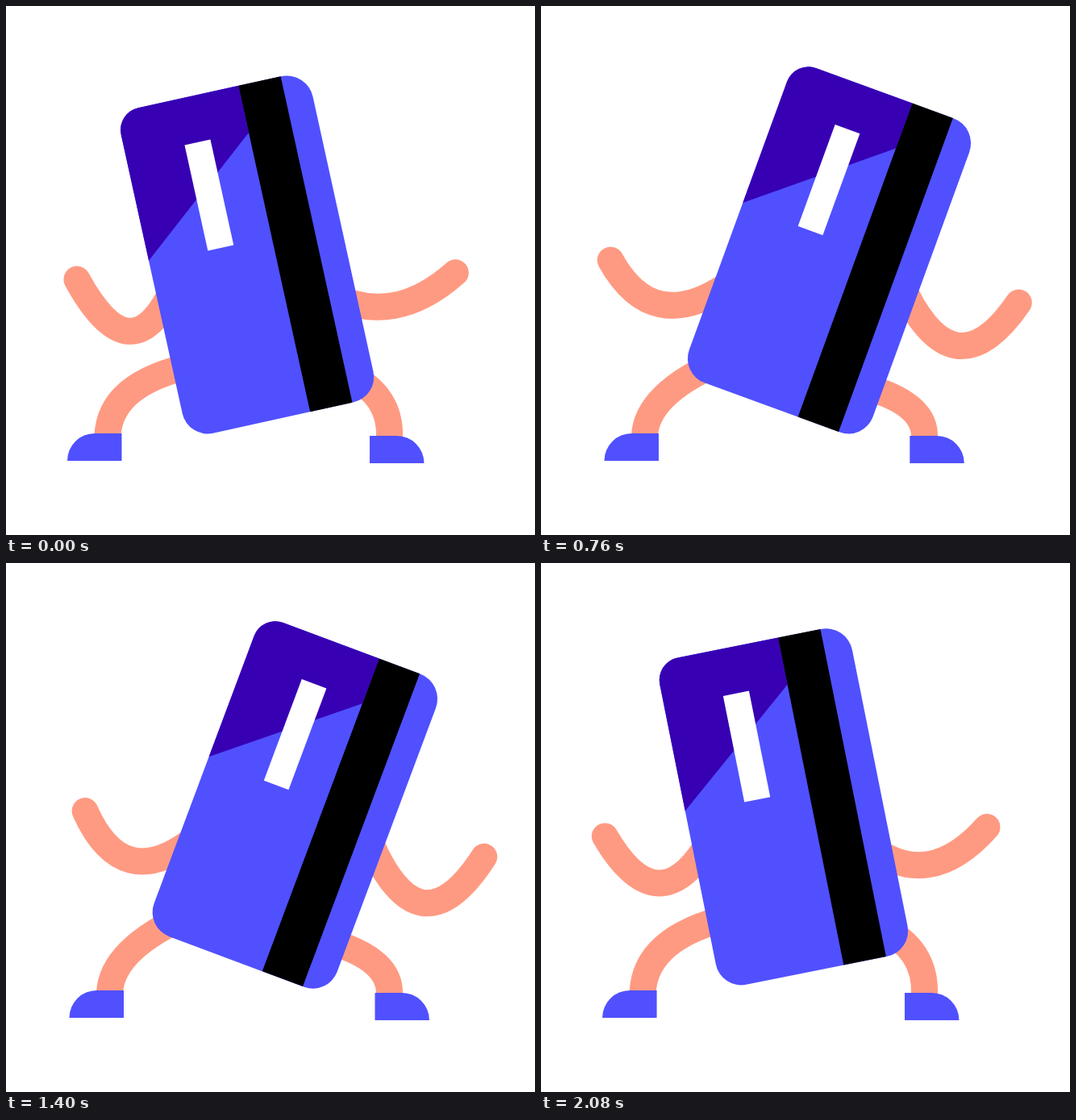
Animation of 656 by 656 pixels, one loop 2120 ms. Source, as an HTML page with a canvas:

```html
<!DOCTYPE html>
<html lang="en">
<head>
<meta charset="utf-8">
<title>Dancing card</title>
<style>
html, body { margin: 0; width: 100%; height: 100%; overflow: hidden; background: #fff; }
canvas { display: block; }
</style>
</head>
<body>
<canvas id="stage" width="656" height="656"></canvas>
<script>
const ctx = document.getElementById('stage').getContext('2d');
const STEP = 40, COUNT = 53;
const BLUE = '#5050ff', DARK = '#3700b3', SKIN = '#ff9a82';

// Cosine with a whole number of cycles per loop, highest at step `peak`
const wave = (n, cycles, peak) => Math.cos(2 * Math.PI * cycles * (n - peak) / COUNT);

function ease(p) {
  p = Math.min(1, Math.max(0, p));
  return (1 - Math.cos(Math.PI * p)) / 2;
}

// 0 = card tilted left, 1 = card tilted right
function leanAt(n) {
  n = (n + COUNT) % COUNT;
  return ease((n - 2) / 18.4) - ease((n - 42) / 11.3);
}

function limb(x, y, bendX, bendY, rootX, rootY) {
  ctx.beginPath();
  ctx.moveTo(x, y);
  ctx.quadraticCurveTo(bendX, bendY, rootX, rootY);
  ctx.stroke();
}

// k = lean of the arms, s = swing (1 is towards the right)
function leftArm(k, s, bob) {
  limb(
    61 + 33 * k + 28 * s, 354.5 - 52 * k + (20 * k - 23) * s + bob,
    135 + 7 * k + (23 - 7 * k) * s, 458 - 56 * k + 26 * k * s + bob,
    207 + 26 * k, 341 - 4 * k + bob
  );
}

function rightArm(k, s, bob) {
  limb(
    517 + 79 * k + 36.5 * s, 309.5 + 52 * k + (10 + 21 * k) * s + bob,
    463.5 + 49.5 * k + (14 + 9 * k) * s, 420 + 63 * k - 33 * s + bob,
    400 + 48 * k, 352 - 20 * k + bob
  );
}

function shoe(x, y, flip) {
  ctx.save();
  ctx.translate(x, y);
  if (flip) ctx.transform(-1, 0, 0, 1, 67.5, 0);
  ctx.beginPath();
  ctx.moveTo(0, 34);
  ctx.arc(34, 34, 34, Math.PI, Math.PI * 1.5);
  ctx.lineTo(67.5, 0);
  ctx.lineTo(67.5, 34);
  ctx.fill();
  ctx.restore();
}

function leftLeg(k, bob) {
  const x = 76 + 2.5 * k;
  limb(x + 50, 533, 129 + 2 * k, 463 + 12 * k + bob / 2, 235 - 5 * k, 438 - 9 * k + bob);
  shoe(x, 530, false);
}

function rightLeg(k, bob) {
  limb(475.5, 536, 478, 478 + 9 * k + bob / 2, 423 - 29 * k, 450 + 12 * k + bob);
  shoe(451 + 6.5 * k * k, 533, true);
}

function rect(color, x, y, w, h) {
  ctx.fillStyle = color;
  ctx.fillRect(x, y, w, h);
}

// Drawn with the top left of the stripe as its zero point
function card(angle, y) {
  const left = -155.2;
  ctx.save();
  ctx.translate(339.7, y);
  ctx.rotate(angle * Math.PI / 180);
  ctx.translate(15.5, -310.1);
  ctx.beginPath();
  ctx.roundRect(left, 0, 87.2 - left, 414, [28, 33, 32, 32]);
  ctx.fillStyle = BLUE;
  ctx.fill();
  ctx.beginPath();
  ctx.moveTo(0, 0);
  ctx.lineTo(0, 59.4);
  ctx.lineTo(left, 188);
  ctx.lineTo(left, 28);
  ctx.arcTo(left, 0, left + 28, 0, 28);
  ctx.fillStyle = DARK;
  ctx.fill();
  rect('#000', 0, 0, 53.6, 414);
  rect('#fff', -81, 57.6, 32.7, 134.2);
  ctx.restore();
}

function draw(n) {
  const bob = 9 * wave(n, 6, 0.94);
  const lean = leanAt(n), armLean = leanAt(n - 1.5);
  rect('#fff', 0, 0, 656, 656);
  ctx.strokeStyle = SKIN;
  ctx.fillStyle = BLUE;
  ctx.lineWidth = 33;
  ctx.lineCap = 'round';
  leftArm(armLean, wave(n, 5, 0.8), bob);
  rightArm(armLean, wave(n, 5, 0.4), bob);
  leftLeg(lean, bob);
  rightLeg(lean, bob);
  card(-12.4 + 32.9 * lean, 398 + bob);
}

function tick() {
  draw(Math.floor(performance.now() / STEP) % COUNT);
  requestAnimationFrame(tick);
}
tick();
</script>
</body>
</html>
```
